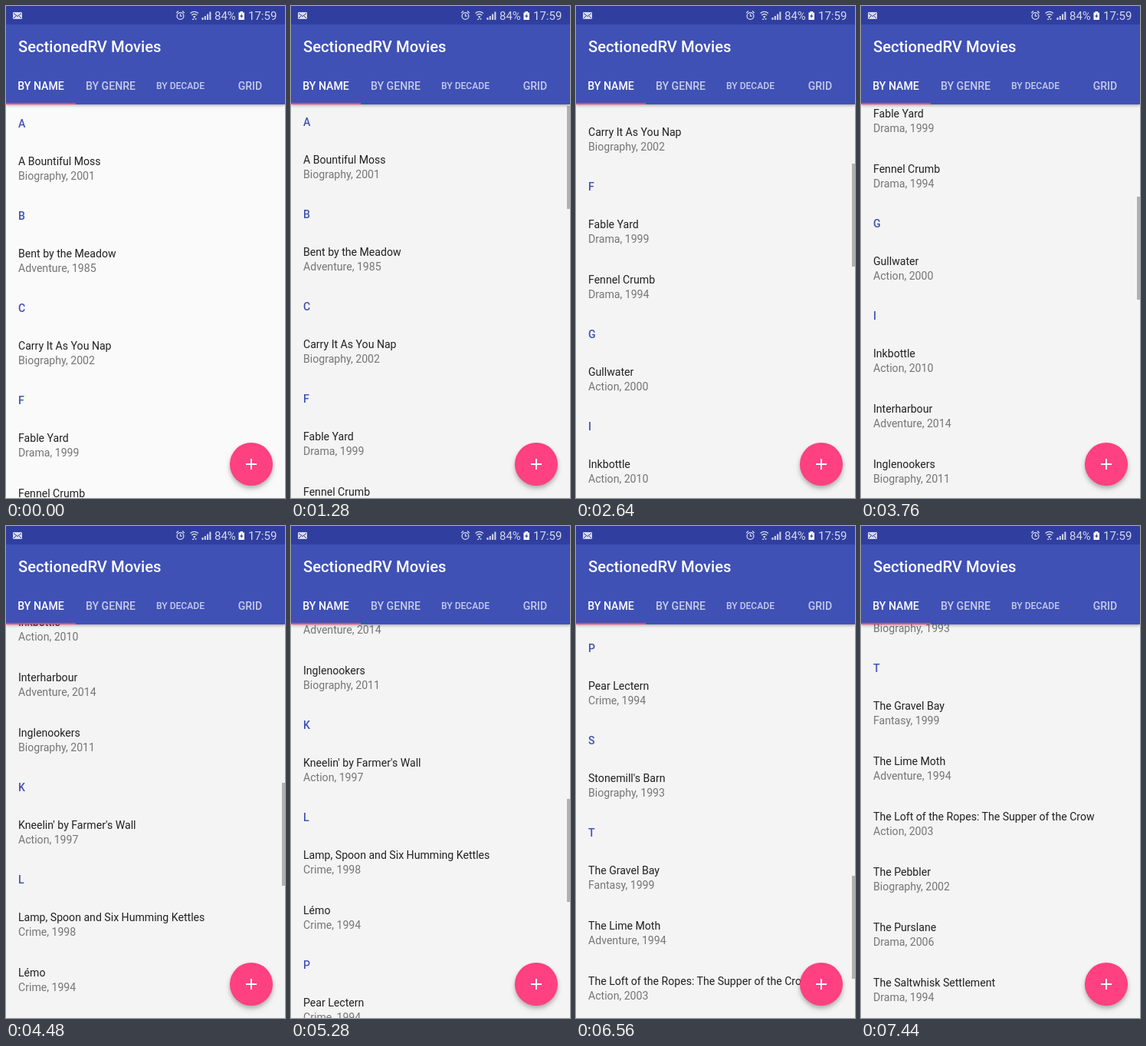
These frames come from a looping animation (364 by 640 pixels, 8000 ms). An HTML page:

```html
<!DOCTYPE html>
<html lang="en">
<head>
<meta charset="utf-8">
<title>SectionedRV Movies</title>
<style>
  html, body { margin: 0; width: 100%; height: 100%; overflow: hidden; }
  body { font: 14.1px/19px Roboto, "Noto Sans", sans-serif; }
  #stage { position: relative; width: 364px; height: 640px; overflow: hidden; background: #fafafa; }
  #list { position: absolute; top: 129px; left: 16px; white-space: nowrap; }
  .head { height: 48px; line-height: 48px; font-weight: 500; color: #3f51b5; }
  .item { height: 72px; padding-top: 15.5px; box-sizing: border-box; color: #212121; }
  .item span { display: block; color: #757575; }
  #thumb { position: absolute; left: 360px; top: 0; width: 4px; height: 134px; background: #b0b0b0; }
  #bar { position: absolute; inset: 0 0 auto; height: 128px; background: #3f51b5; color: #fff;
    font-weight: 500; box-shadow: 0 1px 4px rgba(0, 0, 0, .38); }
  #status { position: absolute; inset: 0 0 auto; height: 24px; background: #303f9f; }
  #status text { font: 400 15px Roboto, "Noto Sans", sans-serif; }
  #title { position: absolute; left: 16px; top: 41px; font-size: 20.2px; line-height: 24px; }
  #tabs { position: absolute; top: 80px; left: 0; display: flex; line-height: 49px; }
  #tabs div { width: 91px; text-align: center; color: rgba(255, 255, 255, .7); }
  #tabs .on { color: #fff; }
  #tabs .small { font-size: 12.1px; }
  #mark { position: absolute; left: 0; top: 126px; width: 91px; height: 2px; background: #ff4081; }
  #fab { position: absolute; left: 291.5px; top: 568px; width: 56.5px; height: 56px; border-radius: 50%;
    background: #ff4081; box-shadow: 0 3px 5px rgba(0, 0, 0, .22), 0 5px 9px rgba(0, 0, 0, .1); }
  #fab::before, #fab::after { content: ""; position: absolute; left: 21px; top: 27px;
    width: 14px; height: 2px; background: #fff; }
  #fab::after { transform: rotate(90deg); }
</style>
</head>
<body>
<div id="stage">
  <div id="list"></div>
  <div id="thumb"></div>
  <div id="bar">
    <svg id="status" width="364" height="24" fill="#d6d9ec">
      <rect x="9" y="8" width="12" height="9" rx="1"/>
      <path d="M10 9.5l5 4 5-4M10 16l3.4-3.4M20 16l-3.4-3.4" fill="none" stroke="#303f9f"/>
      <g fill="none" stroke="#d6d9ec" stroke-width="1.3">
        <circle cx="227.5" cy="13" r="4.4"/>
        <path d="M227.5 10.3v2.9h2.2M222.3 9l2.6-2.4M232.7 9l-2.6-2.4"/>
        <path d="M240.5 9.6q5.2-4.4 10.4 0M242.2 12q3.5-3 7 0"/>
      </g>
      <path d="M243.8 13.6q1.9-1.4 3.8 0l-1.9 2.4zM242.6 18l1.5-2 1.5 2zM246 16.2h3l-1.5 2z"/>
      <path d="M255.5 15h2v3h-2zM258.8 13h2v5h-2zM262.1 10.5h2v7.5h-2zM265.4 7.5h2v10.5h-2z"/>
      <path d="M303.5 8.5h2v-1.500h3.500v1.500h2v9.500h-7.500z" fill="#fff"/>
      <path d="M308.300 9.500l-3.300 4.300h2l-.8 3 3.300-4.300h-2z" fill="#303f9f"/>
      <text x="272" y="18">84%</text>
      <text x="316" y="18">17:59</text>
    </svg>
    <div id="title">SectionedRV Movies</div>
    <div id="tabs">
      <div class="on">BY NAME</div><div>BY GENRE</div><div class="small">BY DECADE</div><div>GRID</div>
    </div>
    <div id="mark"></div>
  </div>
  <div id="fab"></div>
</div>
<script>
const LOOP = 8000, STEP = 80;
const $ = id => document.getElementById(id);

const sections = {
  A: ["A Bountiful Moss|Biography, 2001"],
  B: ["Bent by the Meadow|Adventure, 1985"],
  C: ["Carry It As You Nap|Biography, 2002"],
  F: ["Fable Yard|Drama, 1999", "Fennel Crumb|Drama, 1994"],
  G: ["Gullwater|Action, 2000"],
  I: ["Inkbottle|Action, 2010", "Interharbour|Adventure, 2014", "Inglenookers|Biography, 2011"],
  K: ["Kneelin' by Farmer's Wall|Action, 1997"],
  L: ["Lamp, Spoon and Six Humming Kettles|Crime, 1998", "Lémo|Crime, 1994"],
  P: ["Pear Lectern|Crime, 1994"],
  S: ["Stonemill's Barn|Biography, 1993"],
  T: ["The Gravel Bay|Fantasy, 1999", "The Lime Moth|Adventure, 1994",
    "The Loft of the Ropes: The Supper of the Crow|Action, 2003", "The Pebbler|Biography, 2002",
    "The Purslane|Drama, 2006", "The Saltwhisk Settlement|Drama, 1994"]
};

$("list").innerHTML = Object.entries(sections).map(([letter, movies]) =>
  `<div class="head">${letter}</div>` + movies.map(m => {
    const [name, info] = m.split("|");
    return `<div class="item">${name}<span>${info}</span></div>`;
  }).join("")).join("");

// Four swipes: time in ms, scroll offset in px, speed in px/ms
const swipes = [
  [0, 0, 0], [1200, 0, 0], [1840, 88, .26], [2640, 278, .08], [2800, 284, 0],
  [2960, 284, 0], [3760, 422, .4], [4480, 749, .3], [4720, 785, 0],
  [5040, 785, 0], [5760, 1053, .45], [6080, 1125, 0],
  [6240, 1125, 0], [7040, 1456, 0], [LOOP, 1456, 0]
];

// Scroll offset to thumb top
const thumbStops = [[0, 130], [88, 155], [278, 205], [422, 248], [749, 334], [1053, 411], [1456, 505]];

// Cubic through the points; without speeds it is a straight line
function along(points, x) {
  let i = 1;
  while (i < points.length - 1 && x > points[i][0]) i++;
  const [x0, y0, v0] = points[i - 1], [x1, y1, v1] = points[i];
  const w = x1 - x0, s = (x - x0) / w, slope = (y1 - y0) / w;
  const a = (v0 ?? slope) * w, b = (v1 ?? slope) * w;
  return y0 + s * (a + s * (3 * (y1 - y0) - 2 * a - b + s * (a + b - 2 * (y1 - y0))));
}

function draw(time) {
  const t = Math.floor(time % LOOP / STEP) * STEP;
  const y = along(swipes, t);
  const moved = t >= 1280;
  $("stage").style.background = moved ? "#f4f4f4" : "#fafafa";
  $("list").style.transform = `translateY(${-Math.round(y)}px)`;
  $("thumb").style.transform = `translateY(${Math.round(along(thumbStops, y))}px)`;
  $("thumb").style.opacity = moved ? Math.max(0, Math.min(1, (7440 - t) / 240)) : 0;
}

const start = performance.now();
function tick() {
  draw(performance.now() - start);
  requestAnimationFrame(tick);
}
tick();
</script>
</body>
</html>
```
